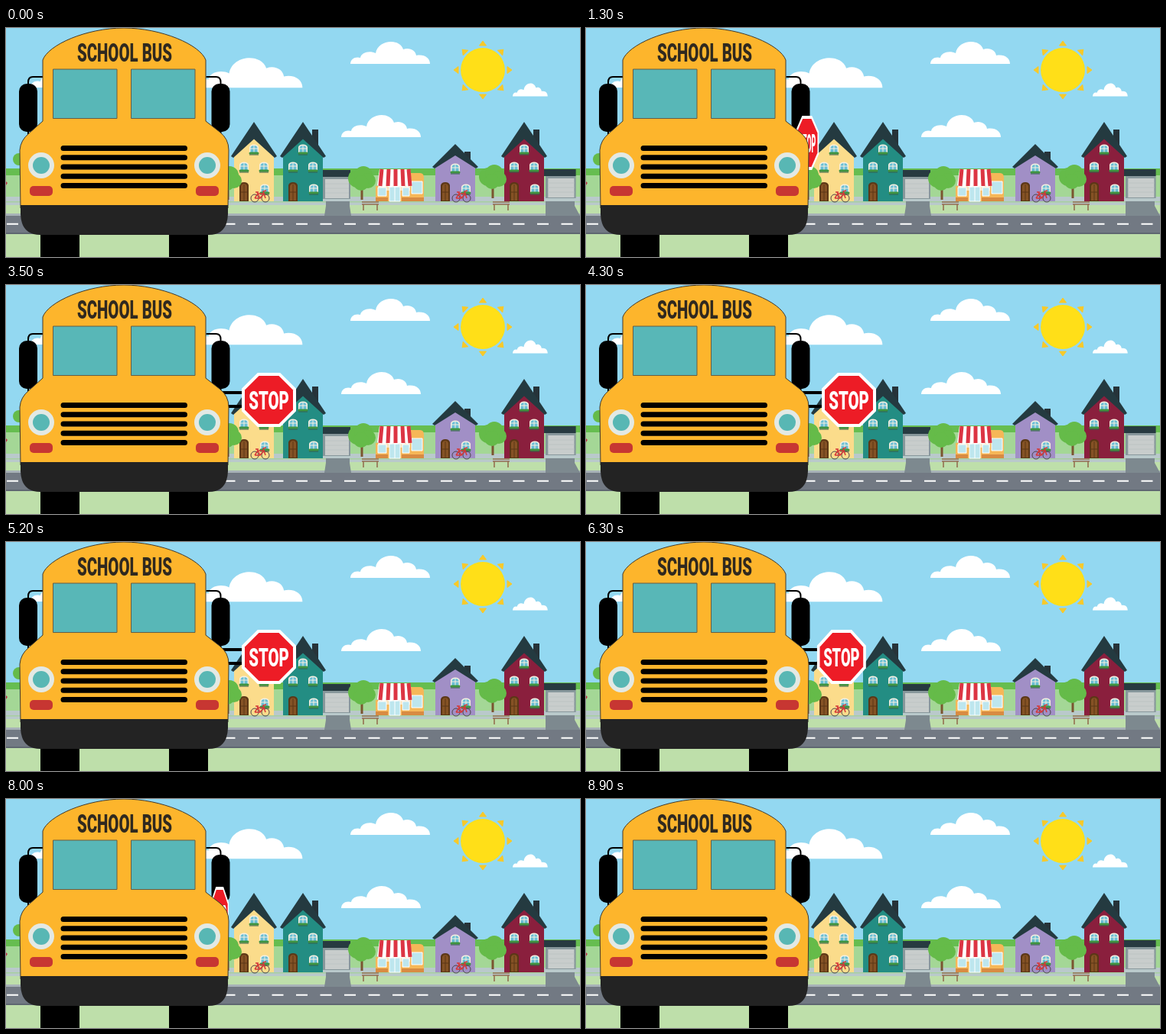
An HTML page for the animation above (9000 ms loop, 750x300 px).

```html
<!DOCTYPE html>
<html lang="en">
<head>
<meta charset="utf-8">
<title>School bus stop arm</title>
<style>
  html, body { margin: 0; width: 100%; height: 100%; overflow: hidden; }
  svg { display: block; width: 100%; height: 100%; }
  text { font: 900 34px Roboto, Inter, sans-serif; text-anchor: middle; }
</style>
</head>
<body>
<svg viewBox="0 0 750 300">
  <defs>
    <path id="cloud" fill="#fff" d="M0 28C0 21 7 18 13 20C14 13 25 10 33 14C36-4 64-6 69 9C77 6 85 10 86 17C96 15 104 20 104 28Z"/>
    <path id="ray" fill="#f8c929" stroke="#f8c929" stroke-linejoin="round" d="M-4.500-32H4.500L0-38Z"/>
    <g id="window">
      <path fill="#f5efe0" d="M-6 5V-3Q-5-6.500 0-6.500T6-3V5Z"/>
      <path fill="#69bfd6" d="M-4.500 4V-2Q-4-5 0-5T4.500-2V4Z"/>
      <path stroke="#f5efe0" d="M0-6V4M-5-1H5"/>
      <path stroke="#3f9440" stroke-width="3" stroke-linecap="round" d="M-5 5H5"/>
      <path stroke="#35604a" d="M-6 7H6"/>
    </g>
    <g id="door">
      <path fill="#5b3716" d="M-6 13V-8Q-5-12 0-12T6-8V13Z"/>
      <path fill="#855224" d="M-4 12V-7Q-3-10 0-10T4-7V12Z"/>
      <path stroke="#5b3716" d="M0-9V12M-4 1H4"/>
    </g>
    <g id="bike" fill="none" stroke="#4c444b">
      <circle cx="-7" cy="0" r="5"/><circle cx="7" cy="0" r="5"/>
      <path stroke="#d53838" stroke-width="1.5" d="M-7 0L-3-6H5L0 0H-7M0 0L-4-8M7 0L4-9L8-10M-6-8H-2"/>
    </g>
    <g id="tree">
      <path stroke="#7a5530" stroke-width="3" d="M0 5V28M0 13L6 6"/>
      <g fill="#65bb49"><circle cx="-6" r="12"/><circle cx="2" cy="-4" r="12"/><circle cx="8" cy="3" r="10"/><circle cx="-1" cy="6" r="10"/></g>
    </g>
    <path id="bench" fill="none" stroke="#946f50" stroke-width="1.6" d="M-11-5H11M-11-2H11M-9-2V6M9-2V6"/>
    <g id="garage">
      <path fill="#87979b" d="M0 9H36V38H0Z"/>
      <path fill="#c8cdcc" d="M3 12H34V37H3Z"/>
      <path stroke="#bdc4c4" d="M3 18H34M3 24H34M3 30H34"/>
      <path fill="#273a40" d="M-2 0H36V9H-2Z"/>
    </g>
    <g id="mirror">
      <path fill="none" stroke="#000" stroke-width="2" d="M48 64H35Q29 64 29 71V148"/>
      <rect x="17" y="73" width="24" height="63" rx="10"/>
    </g>
    <g id="lamp">
      <circle cx="46" cy="180" r="17" fill="#e3e9e4"/>
      <circle cx="46" cy="180" r="11" fill="#58b7b4"/>
      <rect x="31" y="207" width="30" height="13" rx="5" fill="#c73632"/>
    </g>
  </defs>

  <rect width="750" height="300" fill="#93d8f1"/>
  <use href="#cloud" transform="translate(247 40.500) scale(1.35)"/>
  <use href="#cloud" x="32" y="50"/>
  <use href="#cloud" x="450" y="19"/>
  <use href="#cloud" x="438" y="115"/>
  <use href="#cloud" transform="translate(662 73) scale(.44 .59)"/>
  <g id="sun" transform="translate(623 55)"><circle r="29" fill="#ffdf18"/></g>

  <path fill="#66bd50" d="M0 184H750V194H0Z"/>
  <path fill="#a4d796" d="M0 193H750V222H0Z"/>
  <path fill="#b9c9cb" d="M0 221H750V232H0Z"/>
  <path fill="#a7cfa0" d="M0 227H750V228.500H0Z"/>
  <path fill="#bedfaa" d="M0 232H750V300H0Z"/>
  <path fill="#a7b2b7" d="M0 243H750V247H0Z"/>
  <path fill="#727983" d="M0 246H750V269H0Z"/>
  <path fill="#5f6771" d="M0 268H750V270H0Z"/>
  <path fill="#7d898f" d="M418 227H449V233L451 246H416L418 233ZM705 227H743V233L750 246H705Z"/>
  <path stroke="#fff" stroke-width="2" stroke-dasharray="15 16.500" d="M1 256.700H750"/>

  <circle cx="17" cy="172" r="8" fill="#65bb49"/>
  <path fill="#b93445" d="M0 201L2 203L0 206Z"/>
  <use href="#garage" x="414" y="186"/>
  <use href="#garage" transform="translate(705 185) scale(1.1 1)"/>
  <g id="houses"></g>

  <path fill="#f6b758" d="M483 207H487V190H541Q546 190 546 196V227H483Z"/>
  <path fill="#fae4bd" d="M486 207H528V213H486Z"/>
  <path fill="#bde6ee" stroke="#fff" d="M530 201H544V217H530ZM501 208H515V227H501ZM486 209H497V220H486ZM518 209H527V220H518Z"/>
  <path stroke="#fff" d="M508 208V227"/>
  <path fill="#d88b43" d="M483 222H499V227H483ZM517 222H546V227H517Z"/>
  <path fill="#fff" d="M488 185H528L530 206Q526 210 522 207Q518 210 514 207Q510 210 506 207Q502 210 498 207Q492 211 485 206Z"/>
  <path stroke="#dc3543" stroke-width="5" d="M491 185L489 207M500 185L499 207M509 185V207M518 185L519 207M526 185L528 207"/>

  <use href="#tree" x="465" y="197"/>
  <use href="#tree" x="636" y="195"/>
  <use href="#tree" x="290" y="197"/>
  <use href="#bike" x="332" y="223"/>
  <use href="#bike" x="595" y="223"/>
  <use href="#bench" x="476" y="233"/>
  <use href="#bench" x="647" y="233"/>

  <use href="#mirror"/>
  <use href="#mirror" transform="matrix(-1 0 0 1 309.500 0)"/>

  <g id="arm">
    <path stroke="#000" stroke-width="4" d="M0 141H65M0 159H65"/>
    <g transform="translate(96.500 150.500)">
      <path fill="#fff" d="M-14.700-35.500H14.700L35.500-14.700V14.700L14.700 35.500H-14.700L-35.500 14.700V-14.700Z"/>
      <path fill="#ed1c26" d="M-13-31.500H13L31.500-13V13L13 31.500H-13L-31.500 13V-13Z"/>
      <text transform="translate(0 12) scale(.6 1)" fill="#fff">STOP</text>
    </g>
  </g>

  <path d="M45 262H96V300H45ZM213 262H264V300H213Z"/>
  <path fill="#fdb52c" stroke="#40392d" d="M48 42C55 22 105 0 154 0S254 22 261 42V122L279 136Q291 145 291 160L290 236H19L18 160Q19 147 30 138L48 122Z"/>
  <path fill="#232323" d="M19 232H290V244Q289 271 265 271H45Q20 271 19 244Z"/>
  <path fill="#58b7b7" stroke="#655d45" d="M61.500 54H145V118.500H61.500ZM163.500 54H247V118.500H163.500Z"/>
  <path stroke="#000" stroke-width="7" stroke-linecap="round" d="M75 157.500H233.500M75 169.800H233.500M75 182H233.500M75 194.300H233.500M75 206.500H233.500"/>
  <use href="#lamp"/>
  <use href="#lamp" x="217"/>
  <text transform="translate(155 44) scale(.6 1)" fill="#30291f">SCHOOL BUS</text>
</svg>
<script>
const $ = id => document.getElementById(id);
const use = (id, x, y) => `<use href="#${id}" x="${x}" y="${y}"/>`;

// x, y: roof peak; rise: peak to eaves
function house(x, y, rise, color, windows, chimney = true) {
  return `<g transform="translate(${x} ${y})">
    ${chimney ? '<path fill="#263339" d="M12 10H20V34H12Z"/>' : ''}
    <path fill="${color}" d="M-26 ${rise - 4}L0 8L26 ${rise - 4}V${227 - y}H-26Z"/>
    <path fill="#243a40" d="M0 0L30 ${rise}L27 ${rise + 2}L0 ${rise * .5}L-27 ${rise + 2}L-30 ${rise}Z"/>
    ${windows.map(([wx, wy]) => use('window', wx, wy - y)).join('')}
    ${use('door', -13, 214 - y)}
  </g>`;
}

const tall = [[0, 159], [-13, 182], [13, 182], [14, 211]];
$('houses').innerHTML =
  house(324, 123, 45, '#fbdc8b', tall, false) +
  house(388, 123, 45, '#238d83', tall) +
  house(587, 152, 30, '#a18fc6', [[0, 184], [14, 211]]) +
  house(677, 123, 45, '#8a1f3d', tall);

for (let a = 0; a < 360; a += 45)
  $('sun').innerHTML += `<use href="#ray" transform="rotate(${a})"/>`;

// Opens for 3 s, holds for 3 s, closes for 3 s, in steps of 100 ms
function draw(now) {
  const t = Math.floor(now % 9000 / 100) * 100;
  const open = Math.min(1, t / 3000, (9000 - t) / 3000);
  $('arm').setAttribute('transform', `translate(247 0) scale(${open} 1)`);
}

function tick() {
  draw(performance.now());
  requestAnimationFrame(tick);
}
tick();
</script>
</body>
</html>
```
